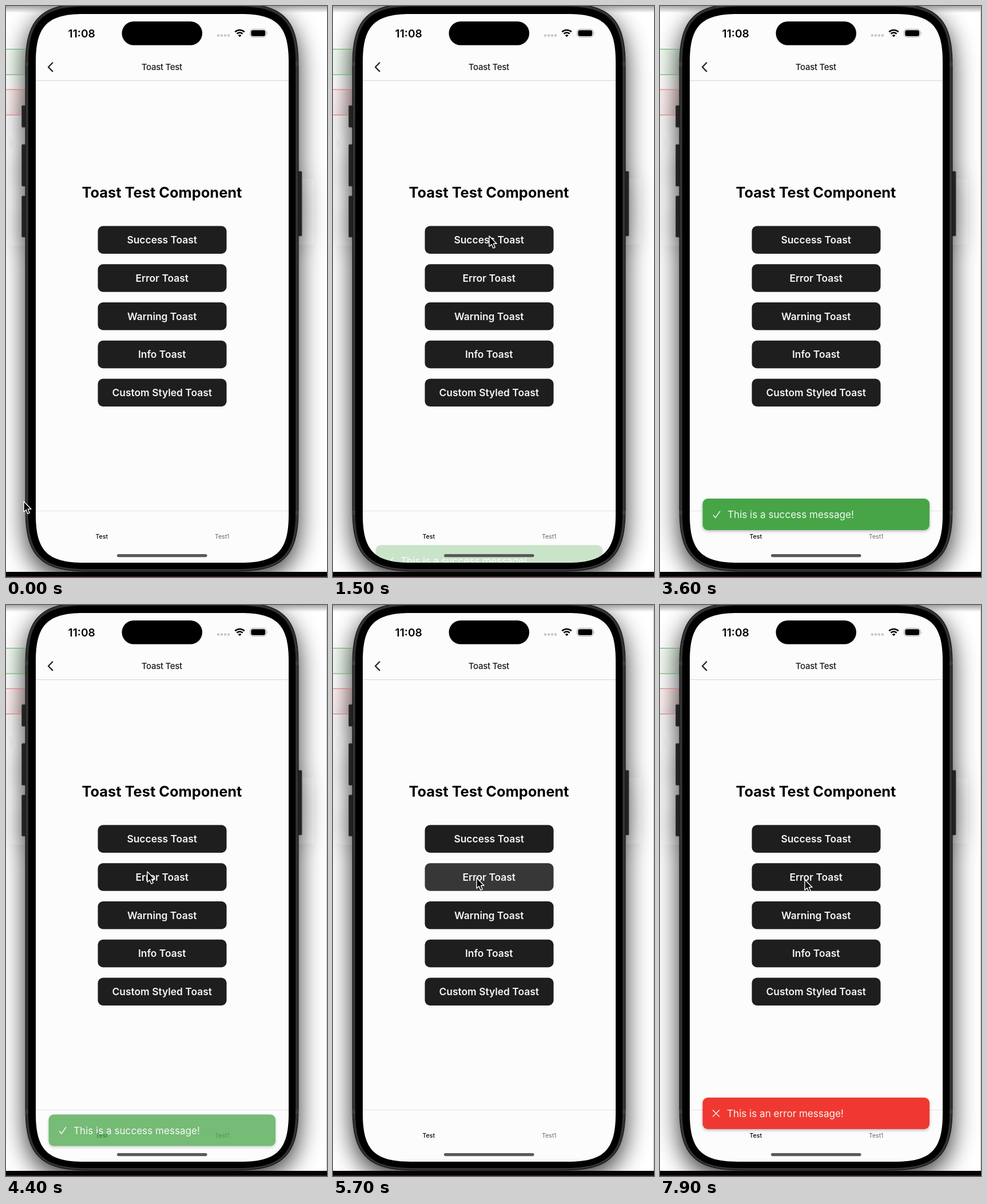
Recreate the animation shown at these times as an HTML page. Size 561 by 998 pixels, loop 8000 ms.

```html
<!DOCTYPE html>
<html lang="en">
<head>
<meta charset="utf-8">
<title>Toast Test</title>
<style>
  html, body { margin: 0; width: 100%; height: 100%; overflow: hidden; background: #fff; }
  svg { display: block; width: 100%; height: 100%; }
  text { font-family: Inter, "Liberation Sans", sans-serif; font-optical-sizing: none; }
  .mid { text-anchor: middle; }
  .title { font-size: 25.4px; font-weight: 700; }
  .label { font-size: 17.4px; font-weight: 600; fill: #f4f4f4; }
  .message { font-size: 17.1px; fill: #f2f7f0; }
  .tab { font-size: 10.5px; }
  .line { fill: none; stroke-linecap: round; stroke-linejoin: round; }
</style>
</head>
<body>
<svg viewBox="0 0 561 998" preserveAspectRatio="none">
  <defs>
    <filter id="blur" filterUnits="userSpaceOnUse" x="-100" y="-100" width="761" height="1200">
      <feGaussianBlur stdDeviation="22"/>
    </filter>
    <filter id="soft" x="-5%" y="-30%" width="110%" height="170%">
      <feDropShadow dx="0" dy="2" stdDeviation="2.8" flood-opacity=".28"/>
    </filter>
    <linearGradient id="topShade" x2="0" y2="1">
      <stop stop-color="#888" stop-opacity=".75"/><stop offset="1" stop-color="#888" stop-opacity="0"/>
    </linearGradient>
    <linearGradient id="greenBox">
      <stop stop-color="#f4fbf4"/><stop offset="1" stop-color="#dcefdc"/>
    </linearGradient>
    <linearGradient id="redBox">
      <stop stop-color="#fef3f3"/><stop offset="1" stop-color="#fbdcdc"/>
    </linearGradient>
    <clipPath id="screen"><path data-box="52 14 442 959 84"/></clipPath>
  </defs>

  <!-- desktop behind the phone -->
  <rect width="561" height="998" fill="#fff"/>
  <path d="M0 75.5H60V120H0z" fill="url(#greenBox)"/>
  <path d="M0 146H60V190.5H0z" fill="url(#redBox)"/>
  <g filter="url(#blur)" opacity=".82" transform="translate(0 14)">
    <path data-box="34 -4 477 992 108"/>
    <use href="#keys"/>
  </g>
  <path d="M0 75.5H40M0 120H40" stroke="#55a85a"/>
  <path d="M0 146H40M0 190.5H40" stroke="#e0666a"/>
  <rect width="561" height="12" fill="url(#topShade)"/>
  <rect id="edge" x="560" width="1" height="989" fill="#c4c4c4"/>
  <rect y="989" width="561" height="9" fill="#050304"/>
  <rect y="997" width="561" height="1" fill="#4a2433"/>

  <!-- phone body -->
  <g id="keys" fill="#222" stroke="#444" stroke-width=".8">
    <rect x="27.5" y="174" width="9" height="38" rx="1.5"/>
    <rect x="27.5" y="242" width="9" height="73" rx="1.5"/>
    <rect x="27.5" y="332" width="9" height="72" rx="1.5"/>
    <rect x="508" y="289" width="9" height="113" rx="1.5"/>
  </g>
  <path data-box="34 -4 477 992 108" fill="#2b2b2b" stroke="#161616"/>
  <path data-box="36.5 -1.5 472 987 105" fill="none" stroke="#414141"/>
  <path d="M34 98h6v7h-6zM505 98h6v7h-6zM34 882h6v7h-6zM505 882h6v7h-6z" fill="#3c3c3c"/>
  <path data-box="39 1 467 983 101"/>
  <path data-box="52 14 442 959 84" fill="#fcfcfc"/>

  <!-- status bar -->
  <text class="mid" x="132.2" y="54.5" font-size="19.2" font-weight="600">11:08</text>
  <rect x="202.5" y="27" width="140.5" height="41.5" rx="20.7"/>
  <g fill="#c6c6c6">
    <circle cx="371" cy="51.5" r="2.2"/><circle cx="377" cy="51.5" r="2.2"/>
    <circle cx="383" cy="51.5" r="2.2"/><circle cx="389" cy="51.5" r="2.2"/>
  </g>
  <path d="M400.3 45.3a11.7 11.7 0 0 1 16.4 0M403.4 48.6a7.4 7.4 0 0 1 10.2 0" fill="none" stroke="#000" stroke-width="2.6"/>
  <path d="M405.6 51.3a4.3 4.3 0 0 1 5.8 0L408.5 54.3z"/>
  <rect x="426.5" y="40.5" width="28.5" height="14" rx="4.6" fill="none" stroke="#a8a8a8"/>
  <rect x="428.3" y="42.3" width="24.9" height="10.4" rx="3"/>
  <path d="M456.2 45.2q1.8 2.3 0 4.6z" fill="#a8a8a8"/>

  <!-- page -->
  <path class="line" d="M81.3 99.3L74 106.7L81.3 114.1" stroke="#222" stroke-width="2.3"/>
  <text class="mid" x="272.3" y="112.3" font-size="15" font-weight="450" letter-spacing="-.3" fill="#1c1c1c">Toast Test</text>
  <path d="M52 130.5H494" stroke="#d6d6d6"/>
  <text class="mid title" x="272.5" y="335">Toast Test Component</text>
  <g id="buttons"></g>
  <path d="M52 882.5H494" stroke="#e4e4e4"/>
  <text class="mid tab" x="167.3" y="931.3" font-weight="500">Test</text>
  <text class="mid tab" x="377.7" y="931.3" fill="#666">Test1</text>

  <g clip-path="url(#screen)">
    <g id="success">
      <rect x="74.5" y="861" width="396.5" height="55" rx="9" fill="#46a546" filter="url(#soft)"/>
      <path class="line" d="M93.3 890.2L97 894.4L104.7 883.2" stroke="#f2f7f0" stroke-width="1.5"/>
      <text class="message" x="118" y="895">This is a success message!</text>
    </g>
    <g id="error">
      <rect x="74.5" y="861" width="396.5" height="55" rx="9" fill="#f03931" filter="url(#soft)"/>
      <path class="line" d="M92.5 883L103.5 894M103.5 883L92.5 894" stroke="#fbeeee" stroke-width="1.5"/>
      <text class="message" x="117" y="895">This is an error message!</text>
    </g>
  </g>
  <rect x="194" y="958" width="157.5" height="5.2" rx="2.6" fill="#595959"/>

  <path id="cursor" d="M0 0V18.2L4.2 14.4L7 21.2L10.2 19.9L7.4 13.3H13z" fill="#000" stroke="#fff" stroke-width="1.4" stroke-linejoin="round"/>
</svg>
<script>
const LOOP = 8000;
const byId = id => document.getElementById(id);
const clamp = v => Math.min(1, Math.max(0, v));
const easeInOut = t => t < .5 ? 2 * t * t : 1 - 2 * (1 - t) ** 2;
const ramp = (t, start, length) => clamp((t - start) / length);

// rectangle whose corners flow smoothly into the sides
function smoothRect(x, y, w, h, corner) {
  const a = corner * .245, c = corner;
  return `M${x + c} ${y}h${w - 2 * c}c${c - a} 0 ${c} ${a} ${c} ${c}` +
    `v${h - 2 * c}c0 ${c - a} ${-a} ${c} ${-c} ${c}`.replace(`${-a} ${c} ${-c}`, `${-a} ${c} ${-c}`) +
    `h${2 * c - w}c${a - c} 0 ${-c} ${-a} ${-c} ${-c}` +
    `v${2 * c - h}c0 ${a - c} ${a} ${-c} ${c} ${-c}z`;
}
for (const path of document.querySelectorAll("[data-box]")) {
  path.setAttribute("d", smoothRect(...path.dataset.box.split(" ").map(Number)));
}

const labels = ["Success Toast", "Error Toast", "Warning Toast", "Info Toast", "Custom Styled Toast"];
byId("buttons").innerHTML = labels.map((label, i) => `
  <g transform="translate(0 ${i * 66.75})">
    <rect x="160.5" y="384.5" width="225" height="48.5" rx="9" fill="#1e1e1e"/>
    <text class="mid label" x="272.7" y="415">${label}</text>
  </g>`).join("");
const buttons = byId("buttons").children;

// time, x, y of the pointer tip
const route = [
  [0, 31, 866], [100, 31, 866], [900, 273, 402], [2050, 273, 402],
  [2400, 217, 978], [2500, 206, 1010], [3600, 215, 1010], [4300, 247, 466],
  [4450, 247, 466], [4650, 251, 477], [7899, 251, 477], [7900, 253, 480], [LOOP, 253, 480]
];

function pointerAt(t) {
  const i = route.findIndex(stop => stop[0] > t);
  const [t0, x0, y0] = route[i - 1], [t1, x1, y1] = route[i];
  const p = easeInOut((t - t0) / (t1 - t0));
  return [x0 + (x1 - x0) * p, y0 + (y1 - y0) * p];
}

function setPress(button, t, down, up) {
  const amount = ramp(t, down, 120) - ramp(t, up, 200);
  button.setAttribute("opacity", 1 - .15 * easeInOut(clamp(amount)));
}

function setToast(id, t, enter, leave) {
  const shown = easeInOut(ramp(t, enter, 300)) - easeInOut(ramp(t, leave, 300));
  byId(id).setAttribute("opacity", shown);
  byId(id).setAttribute("transform", `translate(0 ${112 * (1 - shown)})`);
}

function draw(now) {
  const t = now % LOOP;
  byId("cursor").setAttribute("transform", `translate(${pointerAt(t)})`);
  byId("edge").setAttribute("opacity", t < 3600 ? 0 : 1);
  setPress(buttons[0], t, 1150, 1340);
  setPress(buttons[1], t, 5450, 5630);
  setToast("success", t, 1390, 4292);
  setToast("error", t, 5660, LOOP);
  requestAnimationFrame(draw);
}
requestAnimationFrame(draw);
</script>
</body>
</html>
```
